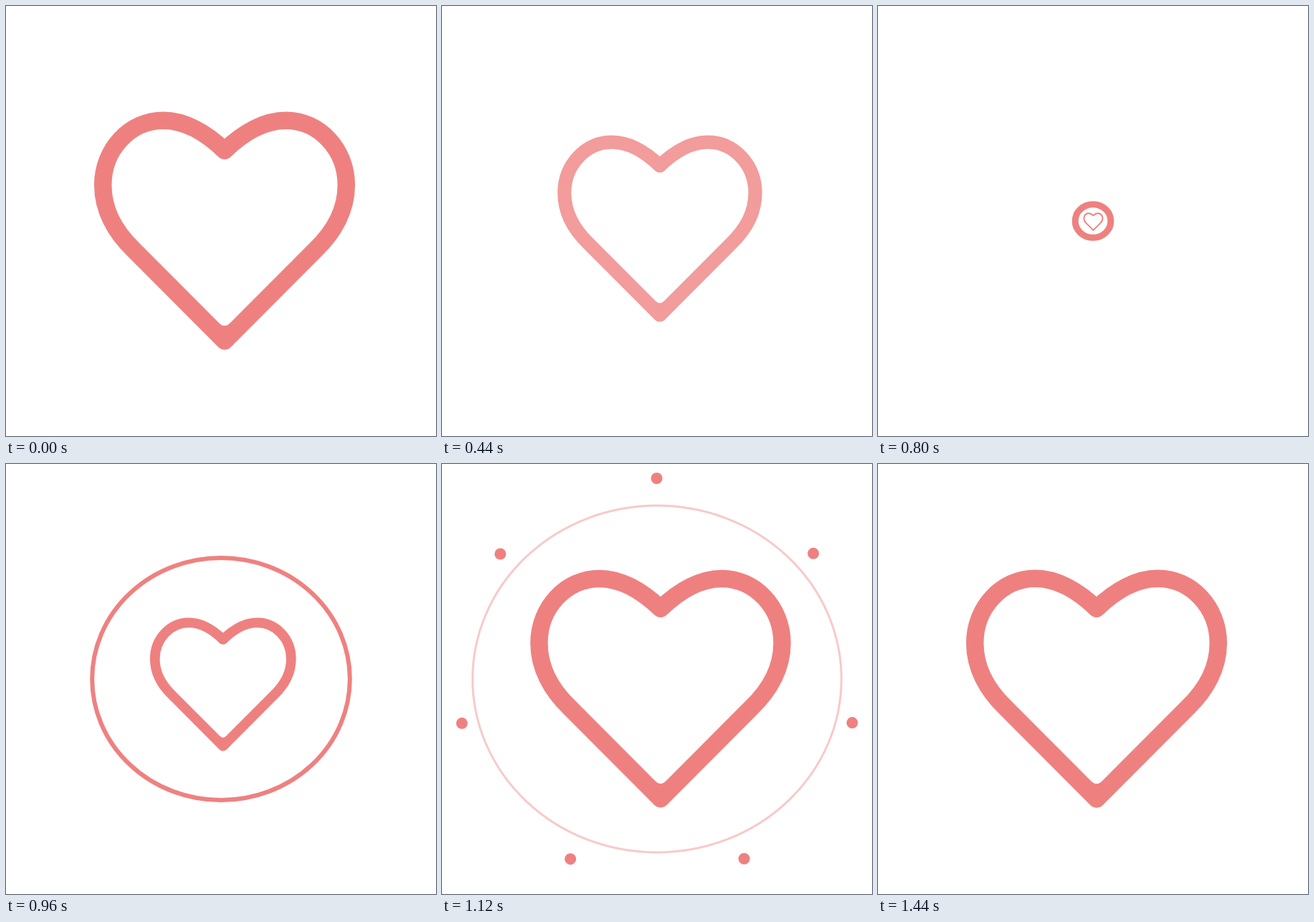
An HTML page with a canvas that plays this animation: 600x600 px, repeating every 1.8 s.

```html
<!DOCTYPE html>
<html lang="en">
<head>
<meta charset="utf-8">
<title>Heart burst</title>
<style>
  html, body { margin: 0; width: 100%; height: 100%; overflow: hidden; background: #fff; }
  canvas { display: block; width: 100vmin; height: 100vmin; }
</style>
</head>
<body>
<canvas id="stage" width="600" height="600"></canvas>
<script>
const ctx = document.getElementById('stage').getContext('2d');
const LOOP = 1800, STEP = 40, COLOR = '#ee8180';

const clamp = v => Math.min(1, Math.max(0, v));
const span = (t, a, b) => clamp((t - a) / (b - a));
const smooth = p => p * p * (3 - 2 * p);
const easeOut = (p, n) => 1 - Math.pow(1 - p, n);

// Cubic bezier easing with handles (x1, 0) and (x2, 1)
function bezier(p, x1, x2) {
  let lo = 0, hi = 1;
  for (let i = 0; i < 24; i++) {
    const u = (lo + hi) / 2, v = 1 - u;
    const x = 3 * x1 * u * v * v + 3 * x2 * u * u * v + u * u * u;
    if (x < p) lo = u; else hi = u;
  }
  return smooth((lo + hi) / 2);
}

// Half of the heart's centre line, x measured from its axis
function halfHeart(path, side) {
  const x = d => 305 + side * d;
  path.moveTo(x(0), 201.7);
  path.bezierCurveTo(x(27), 175.5, x(57), 159.7, x(85.5), 159.7);
  path.bezierCurveTo(x(132), 159.7, x(169.8), 200, x(169.8), 250);
  path.bezierCurveTo(x(169.8), 284, x(153), 315, x(127), 340);
  path.lineTo(x(0), 467.4);
}

const outline = new Path2D();
halfHeart(outline, -1);
halfHeart(outline, 1);

// Rounds the inside of the lower corner
const fillet = new Path2D('M297 442.2 Q305 450 313 442.2 L305 456 Z');

function drawHeart(scale, alpha) {
  if (scale < 0.002 || alpha < 0.002) return;
  const layer = new Path2D();
  ctx.save();
  ctx.translate(300, 300);
  ctx.scale(scale, scale);
  ctx.translate(-300, -300);
  // Opaque tint, so overlapping parts stay even
  const mix = c => Math.round(255 + (c - 255) * alpha);
  ctx.strokeStyle = ctx.fillStyle = `rgb(${mix(238)},${mix(129)},${mix(128)})`;
  ctx.lineWidth = 24.5;
  ctx.lineJoin = ctx.lineCap = 'round';
  layer.addPath(outline);
  ctx.stroke(layer);
  ctx.fill(fillet);
  ctx.restore();
}

function heart(t) {
  if (t < 720) {
    const v = 1 - smooth(span(t, 320, 720));
    drawHeart(v, v);
  } else if (t < 1240) {
    drawHeart(1.1 * bezier(span(t, 720, 1240), 0.333, 0.55), 1);
  } else {
    drawHeart(1.1 - 0.1 * smooth(span(t, 1240, 1440)), 1);
  }
}

function ring(t) {
  if (t <= 780 || t >= 1240) return;
  const grow = easeOut(span(t, 780, 1200), 2);
  ctx.globalAlpha = 1 - span(t, 960, 1240);
  ctx.strokeStyle = COLOR;
  ctx.lineWidth = 3 * (1280 - t) / 160;
  ctx.beginPath();
  ctx.ellipse(300, 300, 267 * grow, 251 * grow, 0, 0, 2 * Math.PI);
  ctx.stroke();
  ctx.globalAlpha = 1;
}

function dots(t) {
  const size = 8 * smooth(span(t, 960, 1040)) * (1 - span(t, 1120, 1333));
  if (size <= 0) return;
  const reach = 164.3 + 120 * easeOut(span(t, 960, 1300), 5);
  ctx.fillStyle = COLOR;
  for (let i = 0; i < 7; i++) {
    const a = -Math.PI / 2 - 0.0015 + i * 2 * Math.PI / 7;
    ctx.beginPath();
    ctx.arc(300 + reach * Math.cos(a), 299.3 + reach * Math.sin(a), size, 0, 2 * Math.PI);
    ctx.fill();
  }
}

function draw(t) {
  ctx.fillStyle = '#fff';
  ctx.fillRect(0, 0, 600, 600);
  ring(t);
  heart(t);
  dots(t);
}

const start = performance.now();
function tick() {
  const t = (performance.now() - start) % LOOP;
  draw(Math.floor(t / STEP) * STEP);
  requestAnimationFrame(tick);
}
tick();
</script>
</body>
</html>
```
